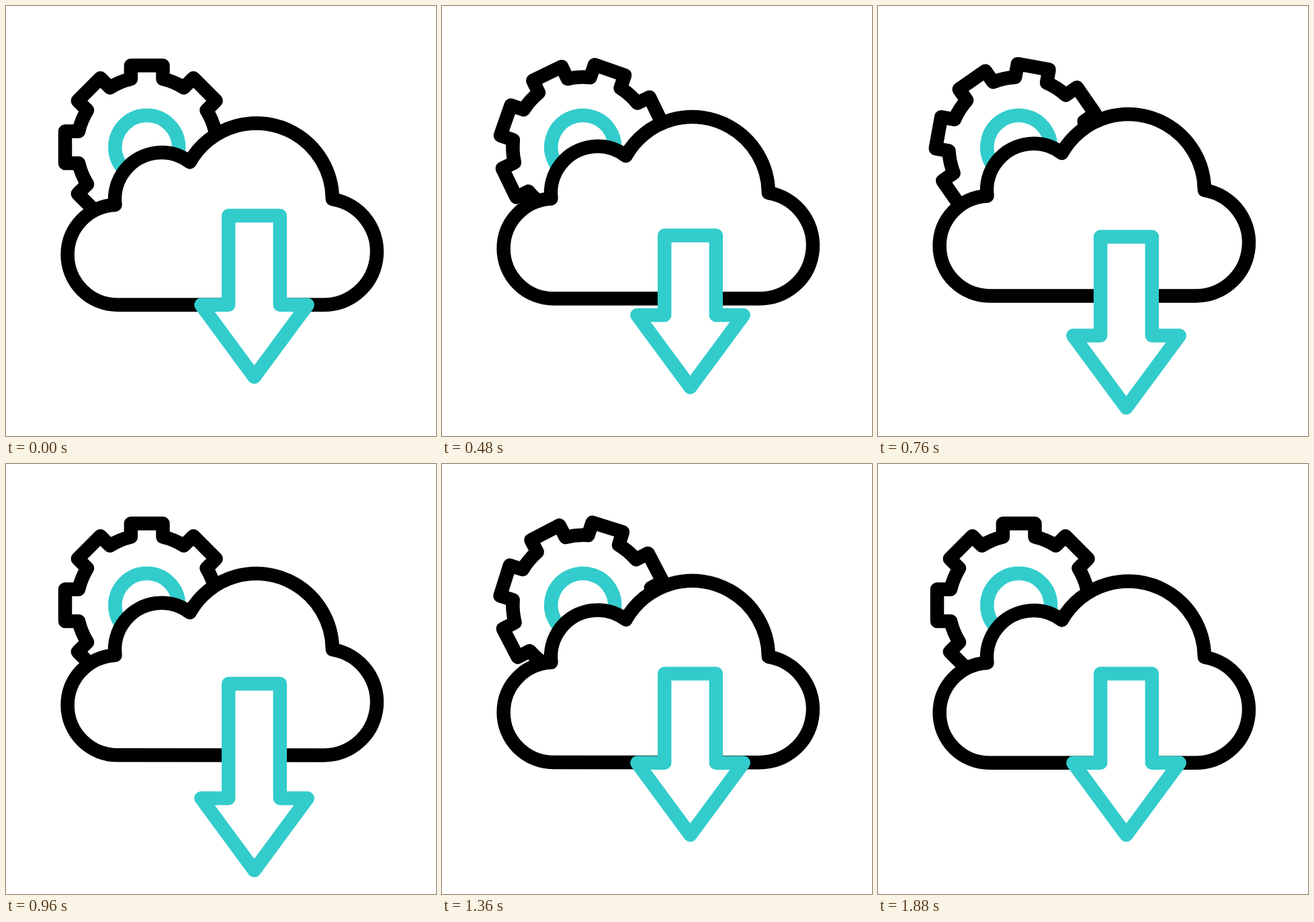
An HTML page with a canvas for the animation above (2000 ms loop, 640 by 640 pixels).

```html
<!DOCTYPE html>
<html lang="en">
<head>
<meta charset="utf-8">
<title>Cloud download</title>
<style>
html, body { margin: 0; width: 100%; height: 100%; overflow: hidden; background: #fff; }
canvas { display: block; width: 640px; height: 640px; }
</style>
</head>
<body>
<canvas width="640" height="640"></canvas>
<script>
const ctx = document.querySelector('canvas').getContext('2d');
const LOOP = 2000, STEP = 40, TEAL = '#33cccc', PI = Math.PI;

// Symmetric ease-in-out: a cubic Bezier with handles (c, 0) and (1 - c, 1)
function ease(x) {
  const c = 0.46;
  let lo = 0, hi = 1, u = 0.5;
  for (let i = 0; i < 24; i++) {
    u = (lo + hi) / 2;
    const v = 1 - u;
    if (3 * c * u * v * v + 3 * (1 - c) * u * u * v + u * u * u < x) lo = u; else hi = u;
  }
  return u * u * (3 - 2 * u);
}

// Eased value at time t from [time, value] keys
function track(t, keys) {
  if (t <= keys[0][0]) return keys[0][1];
  for (let i = 1; i < keys.length; i++) {
    const [t0, a] = keys[i - 1], [t1, b] = keys[i];
    if (t < t1) return a + (b - a) * ease((t - t0) / (t1 - t0));
  }
  return keys[keys.length - 1][1];
}

function paint(color, trace) {
  ctx.beginPath();
  trace();
  ctx.closePath();
  ctx.strokeStyle = color;
  ctx.fill();
  ctx.stroke();
}

function gear(angle) {
  ctx.save();
  ctx.translate(209.7, 210.2);
  ctx.rotate(angle);
  const half = 23.8, foot = 101.6, top = 121.7;
  const r = Math.hypot(half, foot), a = Math.atan2(half, foot);
  paint('#000', () => {
    for (let i = 0; i < 8; i++) {
      ctx.lineTo(-half, -foot);
      ctx.lineTo(-half, -top);
      ctx.lineTo(half, -top);
      ctx.lineTo(half, -foot);
      ctx.arc(0, 0, r, a - PI / 2, PI / 4 - a - PI / 2);
      ctx.rotate(PI / 4);
    }
  });
  paint(TEAL, () => ctx.arc(0, 0, 47.4, 0, 2 * PI));
  ctx.restore();
}

function cloud(dy) {
  ctx.save();
  ctx.translate(0, dy);
  const lobe = (x, y, r, x0, y0, x1, y1) =>
    ctx.arc(x, y, r, Math.atan2(y0 - y, x0 - x), Math.atan2(y1 - y, x1 - x));
  paint('#000', () => {
    lobe(166, 370.3, 74.4, 166, 444.7, 162.3, 296);
    lobe(231.5, 287.6, 69.5, 162.3, 296, 274, 232);
    lobe(372.5, 287.8, 113.4, 274, 232, 486, 287);
    lobe(472.8, 365.6, 79.2, 486, 287, 472.8, 444.7);
  });
  ctx.restore();
}

function arrow(top, head) {
  const y0 = 312 + top, y1 = 444.8 + head;
  paint(TEAL, () => {
    ctx.moveTo(331.2, y0);
    ctx.lineTo(407.8, y0);
    ctx.lineTo(407.8, y1);
    ctx.lineTo(448.7, y1);
    ctx.lineTo(369.5, y1 + 107.3);
    ctx.lineTo(290.4, y1);
    ctx.lineTo(331.2, y1);
  });
}

function draw(t) {
  ctx.fillStyle = '#fff';
  ctx.fillRect(0, 0, 640, 640);
  ctx.lineWidth = 20.5;
  ctx.lineJoin = 'round';
  gear(track(t, [[40, 0], [1880, PI]]));
  cloud(track(t, [[40, 0], [760, -13.3], [1480, 0]]));
  arrow(
    track(t, [[40, 0], [640, 34], [1240, 0]]),
    track(t, [[40, 0], [480, 15.3], [900, 54.3], [1360, 0]])
  );
}

const start = performance.now();
function tick() {
  const t = (performance.now() - start) % LOOP;
  draw(Math.floor(t / STEP) * STEP);
  requestAnimationFrame(tick);
}
tick();
</script>
</body>
</html>
```
